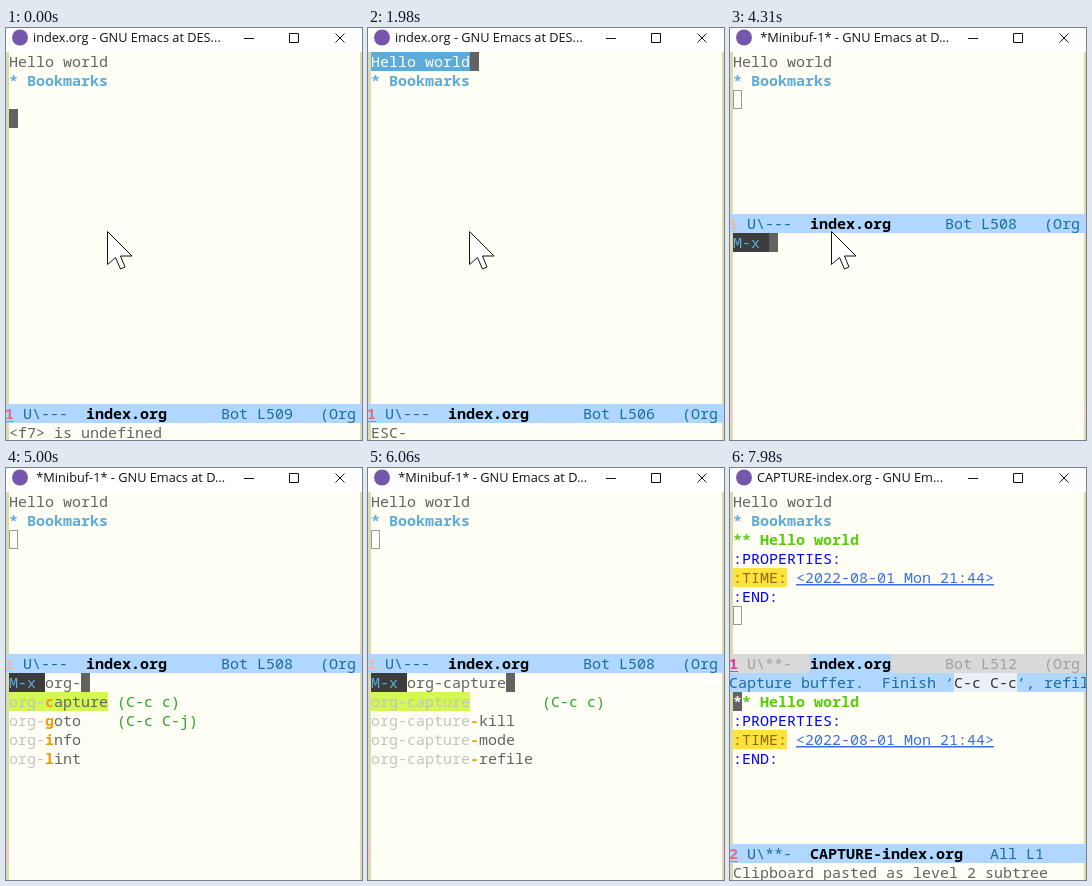
An HTML page that plays this animation: 356 px wide and 412 px high, repeating every 8000 ms.

```html
<!DOCTYPE html>
<html lang="en">
<head>
<meta charset="utf-8">
<title>Org capture</title>
<style>
  html, body { margin: 0; width: 100%; height: 100%; overflow: hidden; background: #fffff5; }
  svg { display: block; width: 356px; height: 412px; }
  text { white-space: pre; font: 15px "Noto Sans Mono", monospace; }
  text.bold { font-weight: 700; }
  text.title { font: 12.75px "Open Sans", sans-serif; }
</style>
</head>
<body>
<svg id="stage" viewBox="0 0 356 412"></svg>
<script>
const LOOP = 8000, CELL = 9, ROW = 19, LEFT = 3, TOP = 24, WIDTH = 356;
const SPLIT = 186, BOTTOM = 376;
const C = {
  paper: '#fffff5', fringe: '#dadab3', ink: '#626262', cursor: '#626262', sky: '#5dabd8',
  bar: '#afd7ff', barInk: '#1b6d9b', idle: '#d9d9d9', idleInk: '#a0a0a0', pink: '#df6f80',
  lime: '#d3f753', faded: '#c4c4bf', orange: '#f59a0b', key: '#2ca32c', green: '#57cc0a',
  blush: '#eecfc0'
};

const escapeText = s => s.replace(/&/g, '&amp;').replace(/</g, '&lt;');
const rect = (x, y, w, h, fill) => `<rect x="${x}" y="${y}" width="${w}" height="${h}" fill="${fill}"/>`;
const text = (x, y, s, fill = C.ink, cls = '', extra = '') =>
  `<text x="${x}" y="${y + 15}" fill="${fill}" class="${cls}" ${extra}>${escapeText(s)}</text>`;
const bold = (x, y, s, fill) => text(x, y, s, fill, 'bold');
const cell = n => LEFT + n * CELL;
const row = n => TOP + n * ROW;
const block = (x, y) => rect(x, y, CELL, ROW, C.cursor);
const hollow = y => `<rect x="3.5" y="${y + .5}" width="8" height="18" fill="none" stroke="#999"/>`;
const echo = s => text(LEFT, BOTTOM + ROW, s);

function windowFrame(title) {
  return rect(0, 0, WIDTH, 412, C.fringe) + rect(0, 0, WIDTH, TOP, '#fff') +
    rect(LEFT, TOP, 351, 388, C.paper) +
    '<circle cx="14" cy="9.5" r="8" fill="#7457ad"/>' +
    text(27, -1, title, '#111', 'title') +
    '<path d="M238 10.5h10M283.5 5.5h9v9h-9zM329.5 5.5l9 9M338.5 5.5l-9 9" fill="none" stroke="#111"/>';
}

function modeline(y, { number = '1', flags = 'U\\---', name = 'index.org', position, mode = '(Org', active = true, numberInk }) {
  const ink = active ? C.barInk : C.idleInk;
  const digitInk = numberInk || (active ? C.pink : '#d8439a');
  const nameWidth = name.length * CELL;
  return rect(0, y, WIDTH, ROW, active ? C.bar : C.idle) +
    rect(80, y, nameWidth, ROW, C.bar) +
    bold(-1, y, number, digitInk) + rect(0, y + 17, 8, 1, digitInk) +
    text(17, y, flags, ink) + bold(80, y, name, '#000') +
    text(Math.max(215, 107 + nameWidth), y, position, ink) + text(314, y, mode, ink);
}

const pointer = () =>
  '<path transform="translate(101.5 203.5)" d="M0 0V33L8 26 13 37.5 17.5 35.5 13 24.5H24.5Z" fill="#fff" stroke="#111"/>';

const notes = (selected = false) =>
  (selected ? rect(LEFT, TOP, 11 * CELL, ROW, C.sky) : '') +
  text(LEFT, TOP, 'Hello world', selected ? '#fff' : C.ink) +
  bold(LEFT, row(1), '* Bookmarks', C.sky);

function editing({ line, col = 0, message = '', selected = false }) {
  const x = cell(col), y = row(line - 506);
  const under = line === 506 && !col ? text(x, y, 'H', '#fff')
    : line === 507 && !col ? bold(x, y, '*', '#fff') : '';
  return windowFrame('index.org - GNU Emacs at DES...') + notes(selected) + block(x, y) + under +
    modeline(BOTTOM, { position: 'Bot L' + line }) + echo(message) + pointer();
}

function candidates(list, typed) {
  const keyColumn = Math.max(...list.map(([name]) => name.length)) + 1;
  const n = typed.length;
  return list.map(([name, key = ''], i) => {
    const y = SPLIT + (i + 2) * ROW;
    return (i ? '' : rect(LEFT, y, name.length * CELL, ROW, C.lime)) +
      text(LEFT, y, name.slice(0, n), C.faded) +
      (n ? bold(cell(n), y, name.slice(n, n + 1), C.orange) + text(cell(n + 1), y, name.slice(n + 1))
         : text(LEFT, y, name)) +
      text(cell(keyColumn), y, key, C.key);
  }).join('');
}

function prompt({ typed = '', list, mouse = false }) {
  const y = SPLIT + ROW;
  return windowFrame(' *Minibuf-1* - GNU Emacs at D...') + notes() + hollow(row(2)) +
    rect(0, BOTTOM, 3, ROW, C.blush) + rect(354, BOTTOM, 2, ROW, C.blush) +
    modeline(SPLIT, { position: 'Bot L508', numberInk: '#efb6a8' }) +
    rect(LEFT, y, 4 * CELL, ROW, '#3c3c3c') + text(LEFT, y, 'M-x', C.sky) +
    text(cell(4), y, typed) + block(cell(4 + typed.length), y) +
    (list ? candidates(list, typed) : '') + (mouse ? pointer() : '');
}

function selecting() {
  const lines = ['Select a capture template', '='.repeat(25), '', '[l]     Add browser bookmark',
    '-'.repeat(39), '-'.repeat(39), '-', '[C]     Customize org-capture-templates', '[q]     Abort'];
  return windowFrame('*Org Select* - GNU Emacs at D...') + notes() +
    modeline(SPLIT, { position: 'Bot L508', active: false }) +
    lines.map((s, i) => text(LEFT, SPLIT + (i + 1) * ROW, s)).join('') +
    modeline(BOTTOM, { number: '2', flags: 'c\\**-', name: '*Org Select*', position: 'All L1', mode: '(Text' }) +
    echo('Template key:');
}

function entry(y) {
  const at = n => y + n * ROW;
  return bold(LEFT, y, '** Hello world', C.green) +
    text(LEFT, at(1), ':PROPERTIES:', '#0000ff') +
    rect(LEFT, at(2), 6 * CELL, ROW, '#ffe33b') + text(LEFT, at(2), ':TIME:', '#8b6b12') +
    text(cell(7), at(2), '<2022-08-01 Mon 21:44>', '#3a6fe0', '', 'text-decoration="underline"') +
    text(LEFT, at(3), ':END:', '#0000ff');
}

function capturing() {
  const header = SPLIT + ROW, body = header + ROW;
  return windowFrame('CAPTURE-index.org - GNU Em...') + notes() + entry(row(2)) + hollow(row(6)) +
    modeline(SPLIT, { flags: 'U\\**-', position: 'Bot L512', active: false }) +
    rect(0, header, WIDTH, ROW, C.bar) + rect(224, header, 7 * CELL, ROW, '#e9f1f6') +
    text(-1, header, 'Capture buffer.  Finish ‘', C.barInk) +
    text(224, header, 'C-c C-c', '#333') + text(287, header, '’, refil', C.barInk) +
    entry(body) + block(LEFT, body) + bold(LEFT, body, '*', '#fff') +
    modeline(BOTTOM, { number: '2', flags: 'U\\**-', name: 'CAPTURE-index.org', position: 'All L1', mode: '' }) +
    echo('Clipboard pasted as level 2 subtree');
}

const capture = ['org-capture', '(C-c c)'];
const recentList = [capture, ['org-capture-expand-as-template'], ['org-goto', '(C-c C-j)'], ['org-lint']];
const orgList = [capture, ['org-goto', '(C-c C-j)'], ['org-info'], ['org-lint']];
const cList = [capture, ['org-cycle'], ['org-ctrl-c-ctrl-c', '(C-c C-c)'], ['org-clock-goto', '(C-c C-x C-j)']];
const captureList = [capture, ['org-capture-kill'], ['org-capture-mode'], ['org-capture-refile']];

const edit = (time, state) => [time, () => editing(state)];
const type = (time, typed, list, mouse) => [time, () => prompt({ typed, list, mouse })];
const steps = [
  edit(0, { line: 509, message: '<f7> is undefined' }),
  edit(790, { line: 508 }),
  edit(920, { line: 507 }),
  edit(1120, { line: 506 }),
  edit(1450, { line: 506, message: 'Mark activated' }),
  edit(1580, { line: 506, col: 11, selected: true }),
  edit(1980, { line: 506, col: 11, selected: true, message: 'ESC-' }),
  edit(2640, { line: 506, col: 11, message: 'Hello world' }),
  edit(3120, { line: 507, col: 11 }),
  edit(3380, { line: 508 }),
  edit(4110, { line: 508, message: 'ESC-' }),
  type(4310, '', null, true),
  type(4380, '', recentList, true),
  type(4510, 'o', recentList),
  type(4650, 'or', orgList),
  type(4850, 'org', orgList),
  type(5000, 'org-', orgList),
  type(5200, 'org-c', cList),
  type(5330, 'org-ca', captureList),
  type(5470, 'org-cap', captureList),
  type(5670, 'org-capt', captureList),
  type(5800, 'org-captu', captureList),
  type(5930, 'org-captur', captureList),
  type(6060, 'org-capture', captureList),
  edit(6920, { line: 508 }),
  [6990, selecting],
  [7980, capturing]
];

const stage = document.getElementById('stage');
const start = performance.now();
let shown = -1;
function tick() {
  const time = (performance.now() - start) % LOOP;
  const current = steps.findLastIndex(([at]) => at <= time);
  if (current !== shown) {
    stage.innerHTML = steps[current][1]();
    shown = current;
  }
  requestAnimationFrame(tick);
}
tick();
</script>
</body>
</html>
```
